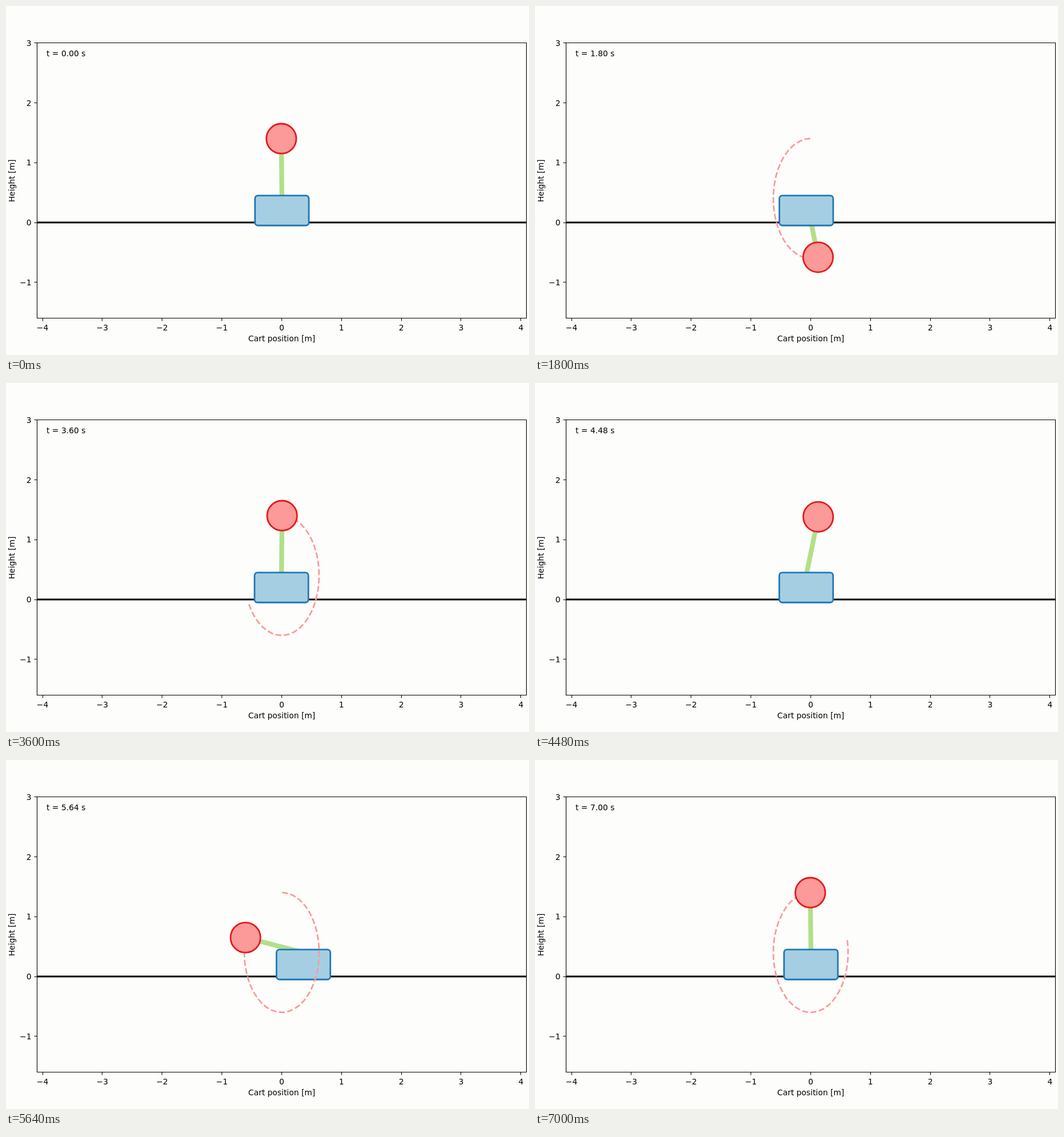
Animation of 917 by 611 pixels, one loop 7.04 s. Source, as an HTML page with a canvas:

```html
<!DOCTYPE html>
<html>
<head>
<meta charset="utf-8">
<style>
html, body { margin: 0; width: 100%; height: 100%; overflow: hidden; background: #fdfdfc; }
canvas { display: block; }
</style>
</head>
<body>
<canvas id="stage" width="917" height="611"></canvas>
<script>
const ctx = document.getElementById('stage').getContext('2d');
const LOOP = 7040, FRAME = 40;
const SCALE = 104.85, X0 = 483.4, Y0 = 379;
const BOX = { left: 54.5, top: 64.5, right: 912.5, bottom: 546.5 };
const G = 9.81, RATIO = 0.375;       // RATIO = bob mass / total mass, rod length 1 m
const STEP = 0.02, TRAIL = 99;       // trail length in samples
const px = x => X0 + x * SCALE;
const py = y => Y0 - y * SCALE;

// Pendulum on a free cart, integrated with RK4 from near upright.
function simulate() {
  const acc = (a, w) => {
    const s = Math.sin(a), c = Math.cos(a);
    return (G * s - RATIO * s * c * w * w) / (1 - RATIO * c * c);
  };
  const angles = [], sub = 4, h = STEP / sub;
  let a = -0.0102, w = 0;
  for (let i = 0; i <= LOOP / 1000 / STEP; i++) {
    angles.push(a);
    for (let j = 0; j < sub; j++) {
      const k1 = acc(a, w);
      const w2 = w + h / 2 * k1, k2 = acc(a + h / 2 * w, w2);
      const w3 = w + h / 2 * k2, k3 = acc(a + h / 2 * w2, w3);
      const w4 = w + h * k3, k4 = acc(a + h * w3, w4);
      a += h / 6 * (w + 2 * w2 + 2 * w3 + w4);
      w += h / 6 * (k1 + 2 * k2 + 2 * k3 + k4);
    }
  }
  return angles;
}
const angles = simulate();
const bobAt = a => [px((1 - RATIO) * Math.sin(a)), py(0.4 + Math.cos(a))];

function stroke(color, width) {
  ctx.strokeStyle = color;
  ctx.lineWidth = width;
  ctx.stroke();
}

function line(x1, y1, x2, y2, color, width) {
  ctx.beginPath();
  ctx.moveTo(x1, y1);
  ctx.lineTo(x2, y2);
  stroke(color, width);
}

function text(str, x, y, align) {
  ctx.fillStyle = '#000';
  ctx.textAlign = align;
  ctx.fillText(str, x, y);
}

function axes() {
  const { left, top, right, bottom } = BOX;
  const label = n => String(n).replace('-', '\u2212');
  ctx.beginPath();
  ctx.rect(left, top, right - left, bottom - top);
  stroke('#000', 1.1);
  for (let n = -4; n <= 4; n++) {
    const x = Math.floor(px(n)) + 0.5;
    line(x, bottom, x, bottom + 5, '#000', 1.1);
    text(label(n), px(n), 567.5, 'center');
  }
  for (let n = -1; n <= 3; n++) {
    const y = Math.floor(py(n)) + 0.5;
    line(left - 5, y, left, y, '#000', 1.1);
    text(label(n), 44.5, py(n) + 5.2, 'right');
  }
  text('Cart position [m]', 483.5, 586.5, 'center');
  ctx.save();
  ctx.translate(14.5, 306);
  ctx.rotate(-Math.PI / 2);
  text('Height [m]', 0, 0, 'center');
  ctx.restore();
}

function draw(ms) {
  const t = Math.floor(ms % LOOP / FRAME) * FRAME / 1000;
  const now = Math.round(t / STEP), angle = angles[now];
  const cart = -RATIO * Math.sin(angle);
  const [bx, by] = bobAt(angle);

  ctx.fillStyle = '#fdfdfc';
  ctx.fillRect(0, 0, 917, 611);
  ctx.font = '13.89px "DejaVu Sans", sans-serif';

  line(BOX.left, Y0, BOX.right, Y0, '#000', 2.8);
  line(px(cart), py(0.4), bx, by, '#b2df8a', 8.33);

  ctx.beginPath();
  ctx.roundRect(px(cart - 0.45), py(0.45), 0.9 * SCALE, 0.5 * SCALE, 0.05 * SCALE);
  ctx.fillStyle = '#a6cee3';
  ctx.fill();
  stroke('#1f78b4', 2.78);

  ctx.beginPath();
  for (let i = Math.max(0, now - TRAIL); i <= now; i++) ctx.lineTo(...bobAt(angles[i]));
  ctx.setLineDash([10.28, 4.44]);
  stroke('#fb9a99', 2.78);
  ctx.setLineDash([]);

  ctx.beginPath();
  ctx.arc(bx, by, 0.25 * SCALE, 0, 2 * Math.PI);
  ctx.fillStyle = '#fb9a99';
  ctx.fill();
  stroke('#e31a1c', 2.78);

  axes();
  text('t = ' + t.toFixed(2) + ' s', 71, 88, 'left');
}

const start = performance.now();
function tick() {
  draw(performance.now() - start);
  requestAnimationFrame(tick);
}
tick();
</script>
</body>
</html>
```
